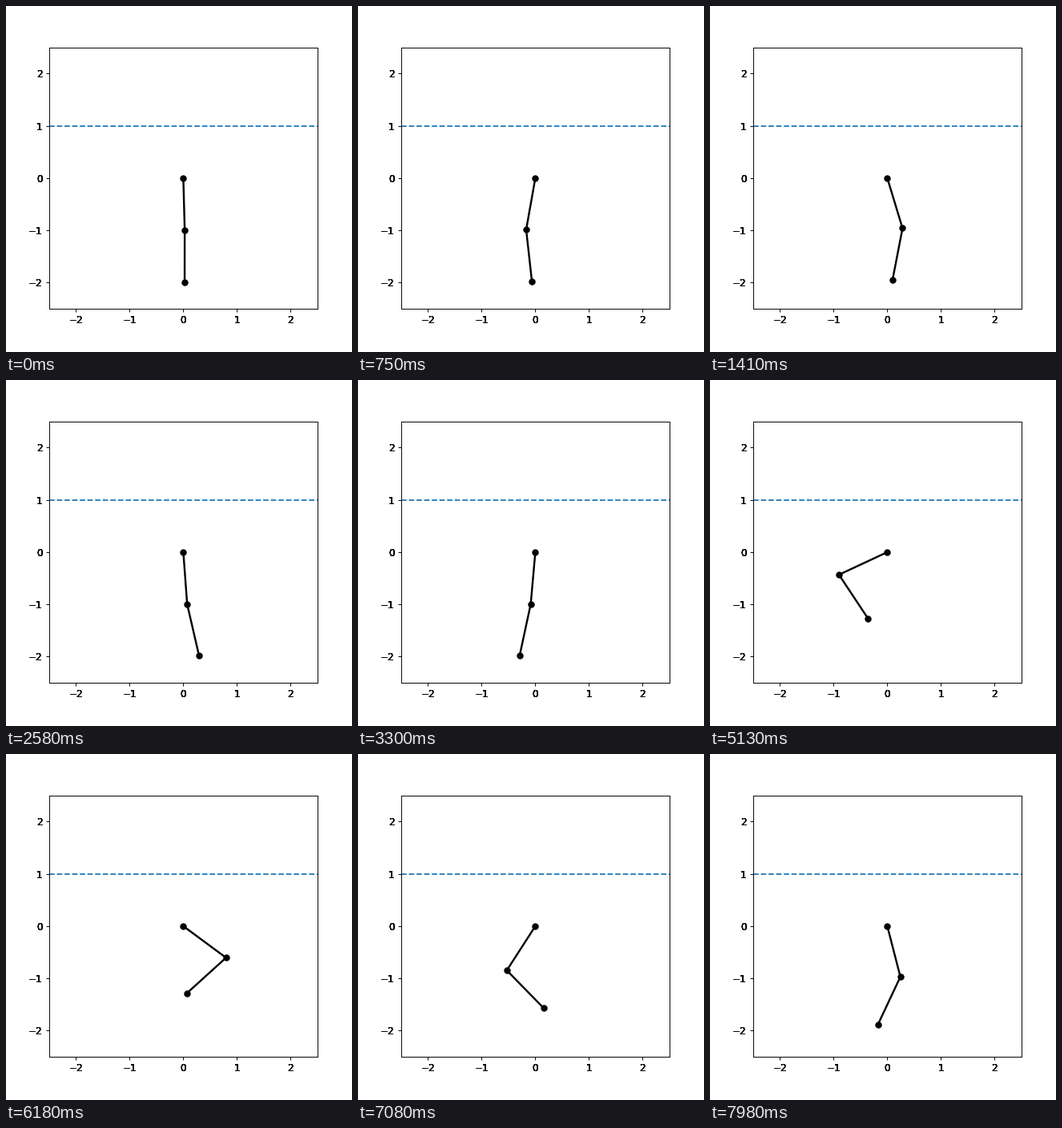
A matplotlib script for the animation above (8 s loop, 432x432 px).

```python
import numpy as np
import matplotlib.pyplot as plt
from matplotlib.animation import FuncAnimation

TICK = 20      # ms between draws
STEP = 30      # ms between poses
LOOP = 8000    # ms
HEAVY = 5      # extra label layers

# The arm is pumped up: swing n turns back at a growing angle, ever more slowly
n = np.arange(-1, 12)
side = np.where(n % 2, -1, 1)
turn = 6.5 + 21.6 * n + 0.31 * n**2
stages = [0, 4, 8, 10]
upper = turn, side * np.interp(n, stages, [0.045, 0.605, 1.335, 1.42])
# The lower link swings against the upper one and lags behind it
lower = turn + 4 - 2 * side, -side * np.interp(n, stages, [0.05, 0.54, 0.93, 0.83])


def swing(link, s):
    """Half-cosine easing from one turning point to the next."""
    times, angles = link
    i = np.searchsorted(times, s, side="right") - 1
    u = (s - times[i]) / (times[i + 1] - times[i])
    return angles[i] + (angles[i + 1] - angles[i]) * (1 - np.cos(np.pi * u)) / 2


def pose(s):
    a, b = swing(upper, s), swing(lower, s)
    x = np.cumsum([0, np.sin(a), np.sin(b)])
    y = np.cumsum([0, -np.cos(a), -np.cos(b)])
    return x, y


plt.rcParams["font.family"] = "DejaVu Sans"
fig = plt.figure(figsize=(5, 5), dpi=86.4, facecolor="white")
ax = fig.add_axes([0.125, 0.125, 0.775, 0.755])
ticks = range(-2, 3)
ax.set(xlim=(-2.5, 2.5), ylim=(-2.5, 2.5), xticks=ticks, yticks=ticks)

# Stacked copies give the labels their heavy, dark edges
xt, xva, xha = ax.get_xaxis_text1_transform(7)
yt, yva, yha = ax.get_yaxis_text1_transform(7)
for v in ticks:
    label = str(v).replace("-", "\u2212")
    for _ in range(HEAVY):
        ax.text(v, 0, label, transform=xt, va=xva, ha=xha)
        ax.text(0, v, label, transform=yt, va=yva, ha=yha)

ax.axhline(1, ls="--", color="#1f77b4")
arm, = ax.plot([], [], "o-", color="black", lw=2)


def draw(k):
    arm.set_data(*pose((k * TICK + TICK // 2) // STEP))
    return arm,


anim = FuncAnimation(fig, draw, frames=LOOP // TICK, interval=TICK,
                     repeat=True, repeat_delay=0)
plt.show()
```
